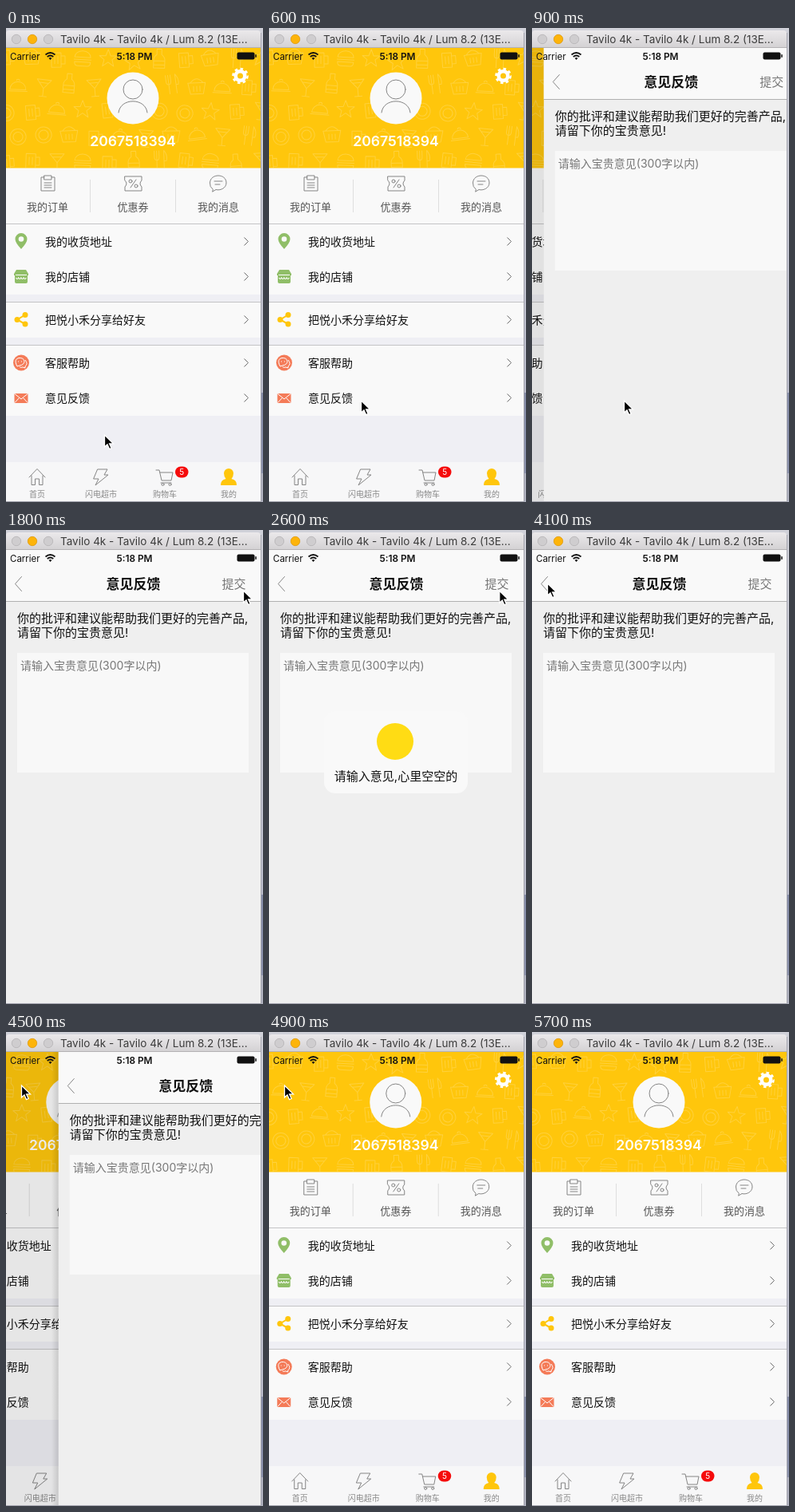
Write an HTML page that moves like this. It is 322 px wide and 594 px high and loops after 5800 ms.

```html
<!DOCTYPE html>
<html lang="zh-CN">
<head>
<meta charset="utf-8">
<title>Feedback screen</title>
<style>
html, body { margin: 0; width: 100%; height: 100%; overflow: hidden; background: #c9cad6; }
svg { display: block; }
text { font-family: Inter, "Noto Sans CJK SC", "Noto Sans CJK JP", "Noto Sans CJK", sans-serif; font-size: 14px; fill: #111; }
.mid { text-anchor: middle; }
.stat { font-size: 13px; fill: #555; text-anchor: middle; }
.tab { font-size: 10px; fill: #888; text-anchor: middle; }
.line { fill: none; stroke: #858585; stroke-linejoin: round; stroke-linecap: round; }
.white { fill: none; stroke: #fff; stroke-width: 1.2; }
.paper { fill: #f9f9f9; }
.rule { fill: #c4c4c6; }
</style>
</head>
<body>
<svg width="322" height="594" viewBox="0 0 322 594">
  <defs>
    <linearGradient id="bar" x2="0" y2="1"><stop stop-color="#ebe9eb"/><stop offset="1" stop-color="#d3d1d3"/></linearGradient>
    <linearGradient id="shade"><stop stop-opacity="0"/><stop offset="1" stop-opacity=".16"/></linearGradient>
    <linearGradient id="desk" x2="0" y2="1">
      <stop stop-color="#d0d1d9"/><stop offset=".77" stop-color="#babccb"/>
      <stop offset=".77" stop-color="#858ca8"/><stop offset=".94" stop-color="#8b92ac"/>
      <stop offset=".94" stop-color="#b0b2bf"/>
    </linearGradient>
    <clipPath id="screen"><rect y="25" width="319" height="568"/></clipPath>
    <clipPath id="banner"><rect y="25" width="320" height="150"/></clipPath>
  </defs>

  <rect width="322" height="594" fill="url(#desk)"/>
  <path d="M319.500 6V593.500H0" fill="none" stroke="#a3a4ae"/>
  <path d="M0 25V7Q0 3 4 3H315Q319 3 319 7V25Z" fill="url(#bar)"/>
  <rect y="24" width="319" height="1" fill="#b4b2b4"/>
  <g stroke-width=".8">
    <circle cx="13" cy="14" r="5.7" fill="#cfcdcf" stroke="#b5b3b5"/>
    <circle cx="33" cy="14" r="5.7" fill="#fdb40a" stroke="#dd9a10"/>
    <circle cx="53" cy="14" r="5.7" fill="#cfcdcf" stroke="#b5b3b5"/>
  </g>
  <text x="68" y="19" style="font-size:13.5px;fill:#3c3c3c">Tavilo 4k - Tavilo 4k / Lum 8.2 (13E...</text>

  <g clip-path="url(#screen)">
    <g id="home">
      <rect y="25" width="320" height="569" fill="#efeff4"/>
      <rect y="175" width="320" height="70" class="paper"/>
      <rect y="25" width="320" height="150.500" fill="#ffc60c"/>
      <g clip-path="url(#banner)"><g id="doodles" fill="none" stroke="#ffd13c" stroke-linejoin="round"></g></g>
      <circle cx="159" cy="88" r="32.5" class="paper"/>
      <circle cx="159" cy="77" r="12" class="line"/>
      <path class="line" d="M141 106C143 87 175 87 177 106"/>
      <text class="mid" x="159" y="148" style="font-size:17.600px;font-weight:600;fill:#fff">2067518394</text>
      <g fill="none" stroke="#fff">
        <circle cx="293.5" cy="60" r="5.800" stroke-width="4.600"/>
        <circle cx="293.5" cy="60" r="8.800" stroke-width="3" pathLength="16" stroke-dasharray="1"/>
      </g>

      <path d="M105.5 190V231M212.5 190V231" stroke="#dedede"/>
      <g class="line">
        <path d="M48 187H44V204H61V187H57M48 185H57V190H48ZM48 194H57M48 197H57M48 200H57"/>
        <path d="M149 186H170V191Q166 195 170 199V204H149V199Q153 195 149 191ZM163 190L156 200"/>
        <circle cx="156" cy="192" r="2"/><circle cx="163" cy="198" r="2"/>
        <path d="M259 202Q255 199 255.500 194C256 182 276 182 276 194C276 201 268 204 263 202.500L259 205ZM261 192H271M262 196H268"/>
      </g>
      <text class="stat" x="52" y="229">我的订单</text>
      <text class="stat" x="159" y="229">优惠券</text>
      <text class="stat" x="266" y="229">我的消息</text>

      <g id="rows"></g>

      <path d="M19 277Q11.500 269 11.500 264.500A7.500 7.500 0 0 1 26.500 264.500Q26.500 269 19 277Z" fill="#90be68"/>
      <circle cx="19" cy="264.500" r="3.300" class="paper"/>
      <path d="M13 303H25L28 308V310H10V308ZM11 310H27V318Q27 320 25 320H13Q11 320 11 318Z" fill="#90be68"/>
      <path class="white" d="M12 309.500H26M12.500 313q1.600 3 3.200 0q1.600 3 3.200 0q1.600 3 3.200 0q1.600 3 3.200 0"/>
      <g fill="#ffc60c"><circle cx="14" cy="365.500" r="3.500"/><circle cx="24" cy="359.500" r="3.500"/><circle cx="24" cy="371" r="3.500"/></g>
      <path d="M24 359.500L14 365.500L24 371" fill="none" stroke="#ffc60c" stroke-width="2"/>
      <circle cx="19" cy="419.500" r="10" fill="#f47b58"/>
      <path class="white" style="stroke-width:1" d="M13 422Q10 415 16 413.500Q22 413 23 417.500Q23 422 17 423L14 424ZM24 416Q28 421 24 424V426L21 425Q18 426 17 424.500M15 418H16M19 418H20"/>
      <rect x="10.500" y="458" width="17" height="12" rx="1" fill="#f47b58"/>
      <path class="white" d="M11 458.500L19 465L27 458.500M11 469.500L16.500 463.500M27 469.500L21.500 463.500" style="stroke-width:1"/>

      <rect y="544" width="320" height="50" fill="#f7f7f8"/>
      <g class="line">
        <path d="M29 563L39 552.500L49 563M32 561V572.500H36.500V565H41.500V572.500H46V561"/>
        <path d="M115 553H127L123 560H128L112 573L116 565H110Z"/>
        <path d="M188 554H192L195 567H207L209 557H193M194 570H207"/>
        <circle cx="196.500" cy="572" r="1.500"/><circle cx="205.500" cy="572" r="1.500"/>
      </g>
      <rect x="212" y="549.500" width="16.500" height="14" rx="7" fill="#f50c0c"/>
      <text class="mid" x="220.200" y="560" style="font-size:10px;fill:#fff">5</text>
      <path d="M269 573Q269 566 275.500 565Q273 562 273 558A6 6 0 0 1 285 558Q285 562 282.500 565Q289 566 289 573Z" fill="#ffc60c"/>
      <text class="tab" x="39" y="588">首页</text>
      <text class="tab" x="119" y="588">闪电超市</text>
      <text class="tab" x="199" y="588">购物车</text>
      <text class="tab" x="279" y="588">我的</text>
    </g>
    <rect id="dim" y="25" width="320" height="569"/>

    <g id="sheet">
      <rect id="shadow" x="-9" y="25" width="9" height="569" fill="url(#shade)"/>
      <rect y="25" width="320" height="569" fill="#efefef"/>
      <rect y="25" width="320" height="64" class="paper"/>
      <rect y="89" width="320" height="1" fill="#b0b0b0"/>
      <path class="line" d="M19.500 58.500L11.500 67.500L19.500 76.500"/>
      <text class="mid" x="159.500" y="73.500" style="font-size:17px;font-weight:600">意见反馈</text>
      <text x="270.500" y="73" style="font-size:15px;fill:#777">提交</text>
      <text x="14" y="116" style="font-size:15px">你的批评和建议能帮助我们更好的完善产品,</text>
      <text x="14" y="134" style="font-size:15px">请留下你的宝贵意见!</text>
      <rect x="14" y="154" width="290" height="150" fill="#f8f8f8"/>
      <text x="18" y="175" style="fill:#777">请输入宝贵意见(300字以内)</text>
    </g>

    <g id="toast">
      <rect x="69" y="227" width="180" height="103" rx="14" class="paper"/>
      <circle cx="158" cy="265" r="23" fill="#ffdc14"/>
      <text class="mid" x="159" y="314" style="font-size:15px">请输入意见,心里空空的</text>
    </g>

    <text x="5" y="39.500" style="font-size:11.500px">Carrier</text>
    <g fill="none" stroke="#111" stroke-width="1.700">
      <path d="M49.500 33.500Q55.500 28.500 61.500 33.500M51.700 36Q55.500 33 59.300 36"/>
      <path d="M55.500 40L53.500 37.700Q55.500 36.500 57.500 37.700Z" fill="#111" stroke="none"/>
    </g>
    <text class="mid" x="161" y="39.500" style="font-size:11.800px;font-weight:600">5:18 PM</text>
    <rect x="289.500" y="30.500" width="22" height="9" rx="2" fill="#111"/>
    <rect x="312.300" y="33" width="1.500" height="4" rx=".7" fill="#111"/>
  </g>
  <path id="cursor" d="M0 0V15L3.500 11.800L6 17.600L8.600 16.500L6.100 10.900H11Z" fill="#000" stroke="#fff" stroke-width="1.300"/>
</svg>

<script>
const LOOP = 5800, PUSH = 635, POP = 4454, WIDTH = 320;
const byId = id => document.getElementById(id);
const clamp = v => Math.max(0, Math.min(1, v));

// [label, row centre]; border lines open each group
const rows = [['我的收货地址', 267.5], ['我的店铺', 311.5], ['把悦小禾分享给好友', 365.5],
  ['客服帮助', 419.5], ['意见反馈', 463.5]];
byId('rows').innerHTML = rows.map(([label, y]) =>
  `<rect class="paper" y="${y - 21.5}" width="320" height="44"/>
   <text x="49" y="${y + 5.5}">${label}</text>
   <path d="M298.500 ${y - 5}l5 5l-5 5" fill="none" stroke="#6c6c6c"/>`).join('') +
  [245, 343, 397].map(y => `<rect class="rule" y="${y}" width="320" height="1"/>`).join('');

// Kitchen doodles, each around its own centre
const doodles = [
  'M-12 7H12M-10 5A10 10 0 0 1 10 5ZM-2-6A2 2 0 1 1 2-6',
  'M-10-2A10 8 0 0 1 10-2ZM-11 1H11M-10 4H10Q10 9 6 9H-6Q-10 9-10 4Z',
  'M-9-10H9L0 1ZM0 1V11M-5 11H5M-6-6H6',
  'M0-11L3-3L11-3L5 2L7 10L0 5L-7 10L-5 2L-11-3L-3-3Z',
  'M-7-9H5V9H-7ZM5-5H10V5H5M-3-5V5M1-5V5',
  'M-6-12V-4Q-6 0-3 0Q0 0 0-4V-12M-3-12V12M6 12V-12Q11-6 9 1H6',
  'M-3-12H3V-5Q7-2 7 2V12H-7V2Q-7-2-3-5ZM-7 3H7M-7 8H7',
  'M-11-6H11L8 8H-8ZM-8-6Q0-16 8-6M-4-2V5M0-2V5M4-2V5',
  'M0-10A10 10 0 1 0 .1-10M0-6A6 6 0 1 0 .1-6'
];
let seed = 11;
const random = () => (seed = seed * 16807 % 2147483647) / 2147483647;
let art = '';
for (let row = 0; row < 5; row++) {
  for (let col = 0; col < 11; col++) {
    const x = col * 32 + row % 2 * 15, y = 37 + row * 32 + random() * 6;
    const kind = Math.floor(random() * doodles.length);
    art += `<path d="${doodles[kind]}" transform="translate(${x} ${y}) rotate(${random() * 16 - 8})"/>`;
  }
}
byId('doodles').innerHTML = art;

// [time, x, y]
const track = [[0, 123.5, 510], [450, 115.5, 467], [1000, 115.5, 467], [1700, 297.5, 76],
  [2500, 297.5, 76], [3400, 42.5, 82], [3500, 42.5, 82], [4000, 19.5, 67],
  [5000, 19.5, 67], [5500, -16, 62], [LOOP, -16, 62]];

function cursorAt(t) {
  const i = track.findIndex(key => key[0] > t);
  const [t0, x0, y0] = track[i - 1], [t1, x1, y1] = track[i];
  const p = (t - t0) / (t1 - t0), e = p * p * (3 - 2 * p);
  return [x0 + (x1 - x0) * e, y0 + (y1 - y0) * e];
}

// Critically damped navigation spring, 0 to 1
function spring(ms) {
  const u = Math.max(0, ms) * 0.01826;
  return 1 - (1 + u) * Math.exp(-u);
}

function draw(now) {
  const t = Math.floor(now % LOOP / 100) * 100;
  const pushing = t < POP;
  const open = pushing ? spring(t - PUSH) : 1 - spring(t - POP);
  byId('home').setAttribute('transform', `translate(${-0.3 * WIDTH * open})`);
  byId('sheet').setAttribute('transform', `translate(${WIDTH * (1 - open)})`);
  byId('sheet').setAttribute('visibility', open > 0.003 ? 'visible' : 'hidden');
  byId('shadow').setAttribute('opacity', pushing ? 1 - open : open);
  byId('dim').setAttribute('opacity', 0.1 * open);
  byId('toast').setAttribute('opacity', Math.min(clamp((t - 2000) / 200), clamp((4100 - t) / 200)));
  byId('cursor').setAttribute('transform', `translate(${cursorAt(t)})`);
  requestAnimationFrame(() => draw(performance.now() - start));
}
const start = performance.now();
draw(0);
</script>
</body>
</html>
```
